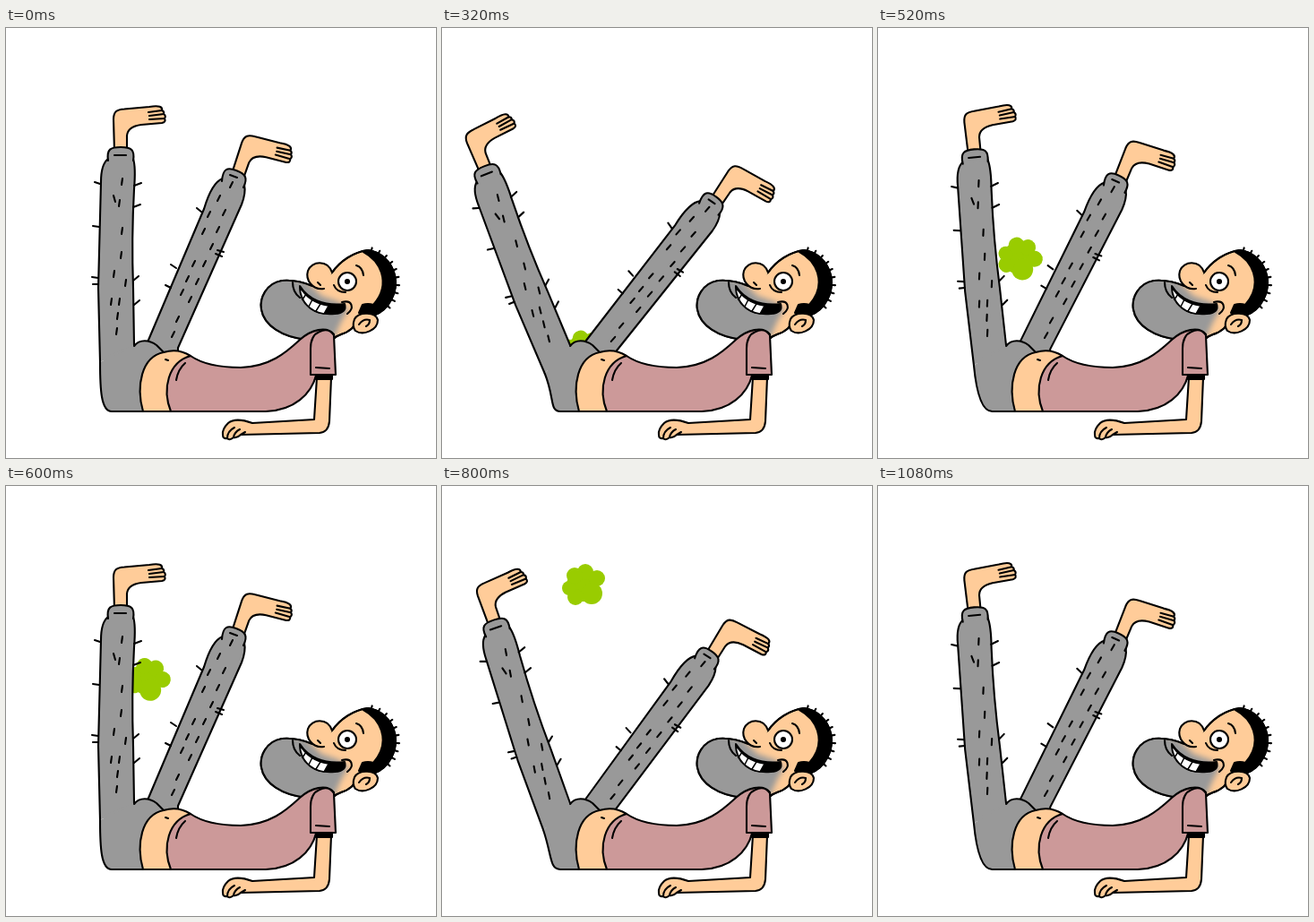
Recreate the animation shown at these times as an HTML page. Size 480 by 480 pixels, loop 1120 ms.

```html
<!DOCTYPE html>
<html>
<head>
<meta charset="utf-8">
<style>
html, body { margin: 0; width: 100%; height: 100%; overflow: hidden; background: #fff; }
svg { display: block; width: 100vw; height: 100vh; }
.line { fill: none; }
.grey { fill: #999; }
.skin { fill: #fc9; }
.shirt { fill: #c99; }
.bare { stroke: none; }
</style>
</head>
<body>
<svg viewBox="0 0 480 480" stroke="#000" stroke-width="2.1" stroke-linecap="round" stroke-linejoin="round">
  <defs>
    <g id="foot">
      <path class="skin" d="M-7 4L-8-32C-8-41-4-43 4-43.500L32-46C43-48 47-46 46-42Q49-41 48-38Q51-36 49-33Q51-29 46-28L23-26Q8-24 7-14V4"/>
      <path class="line" d="M31-40L46-42M32-36L48-38M32-32L49-33"/>
    </g>
    <path id="face" d="M342 288C330 283 318 281 308 282C290 285 283 302 285 314C288 332 308 345 336 348H364Q368 344 374 342Q389 337 390 328L410 321C428 315 438 294 434 276C430 260 418 250 404 248C388 250 373 260 364 273Z"/>
    <clipPath id="faceClip"><use href="#face"/></clipPath>
    <filter id="soft"><feGaussianBlur stdDeviation="3"/></filter>
  </defs>

  <g id="cloud" fill="#9c0" stroke="none">
    <circle r="18"/>
    <circle cx="3" cy="-15" r="9"/><circle cx="16" cy="-8" r="9"/>
    <circle cx="10" cy="9" r="12"/><circle cx="-8" cy="13" r="9"/>
    <circle cx="-15" cy="3" r="8"/><circle cx="-9" cy="-11" r="9"/>
  </g>

  <g id="rightLeg">
    <use href="#foot" transform="translate(260 161) rotate(19.500)"/>
    <path class="grey" d="M160 366L157 353L221 202Q230 172 242 168L266 175Q268 184 263 197L192 357V370"/>
    <path class="grey" d="M241 171C242 157 247 155 257 159C268 163 270 168 265 178"/>
    <path class="line" d="M250 164L258 167M213 201L219 206M184 264L190 268M178 287L184 290M236 248L243 250M234 252L241 255"/>
    <path class="line" id="rightDashes"/>
  </g>

  <g id="leftLeg">
    <use href="#foot" transform="translate(128 134)"/>
    <path class="grey" d="M105 373L103 290L106 172Q106 152 114 146H142Q145 155 143 180Q140 235 142 290L143 354"/>
    <path class="grey bare" d="M107 368L142 354L150 375L125 390Z"/>
    <path class="grey" d="M114 148C112 135 117 133 128 133C140 133 144 136 142 148"/>
    <path class="line" d="M121 142H134M99 172L105 174M143 176L151 173M142 200L150 197M97 221L104 222M142 282L148 277M143 309L149 304M96 278L103 279M97 286H103M120 187L122 194"/>
    <path class="line" id="leftDashes"/>
  </g>

  <path class="grey bare" id="hip"/>
  <path class="line" id="seat"/>
  <path class="line" d="M143 355C149 347 160 348 168 354L176 362"/>

  <path class="skin" d="M153 428C145 400 151 367 176 362Q192 357 206 366L190 428Z"/>
  <path class="line" d="M178 370L181 371"/>

  <use href="#face" class="skin"/>
  <g clip-path="url(#faceClip)" stroke="none">
    <path class="grey" filter="url(#soft)" d="M265 265L335 282L352 299L372 306L382 314L374 328L358 365H265Z"/>
  </g>
  <use href="#face" class="line"/>
  <path d="M404 248C428 252 439 277 432 298Q425 314 410 321L394 318L398 309Q404 307 410 309C419 299 423 286 419 273Q414 258 399 250Z"/>
  <path class="line" id="hair"/>
  <path class="skin" d="M389 325C394 316 413 317 415 326C415 337 399 344 390 338Q386 333 389 325"/>
  <path class="line" d="M394 331Q399 324 406 326Q406 331 402 333"/>
  <path class="skin" d="M355 291C342 293 334 281 337 271C341 260 359 258 364 273"/>
  <path class="line" d="M348 284L351 287M391 265Q398 267 399 276M366 287Q369 295 379 295"/>
  <circle cx="381" cy="283" r="10" fill="#fff"/>
  <circle cx="381" cy="283" r="2" fill="#000"/>
  <path d="M328 288C337 302 354 311 378 308Q381 318 367 319C345 321 328 310 328 288Z"/>
  <path fill="#fff" stroke-width="1.5" d="M328 289C335 301 347 308 360 310L355 319C340 317 329 306 328 289ZM335 297L331 303M342 303L338 311M351 308L346 316"/>
  <path class="line" d="M320 284Q320 295 328 301M375 306C387 303 389 313 381 319"/>

  <path class="shirt" d="M206 366C222 377 242 379 262 379C294 378 312 363 328 348C340 337 358 332 366 342L346 388C341 408 322 427 290 428H184C174 403 181 373 206 366Z"/>
  <path class="line" d="M190 393Q192 381 200 374M153 428H190"/>
  <path class="skin" d="M347 390L344 437L275 441C264 437 254 436 248 441Q241 448 242 454Q242 459 247 458Q249 461 254 457Q258 458 262 454L350 452Q360 451 361 439L363 390Z"/>
  <path class="line" d="M247 458Q247 450 255 446M254 457Q255 451 261 448M262 454L267 451"/>
  <path d="M346 388H364V392H346Z"/>
  <path class="shirt" d="M340 358Q340 343 350 339Q360 334 366 343L368 387H340Z"/>
  <path class="line" d="M346 379L361 380"/>
</svg>
<script>
const el = id => document.getElementById(id);
const dashes = (id, step, points) =>
  el(id).setAttribute('d', points.map(p => `M${p}l${step}`).join(''));

dashes('leftDashes', '-1 7', ['130 168', '127 192', '130 223', '129 250', '121 271', '134 281', '118 302', '127 302', '125 318', '124 335']);
dashes('rightDashes', '-3 6', ['253 172', '239 187', '245 203', '228 205', '238 222', '222 224', '231 241', '211 260', '223 260', '204 277', '215 280', '198 292', '207 300', '193 322', '188 339']);

let spikes = '';
for (let deg = -75; deg <= 45; deg += 13) {
  const a = deg * Math.PI / 180, x = Math.cos(a), y = Math.sin(a);
  spikes += `M${398 + 34 * x} ${285 + 34 * y}l${7 * x} ${7 * y}`;
}
el('hair').setAttribute('d', spikes);

const TICK = 40, LOOP = 1120;
const leftAngles = [0, 7.4, 14.7, 18.8, 21.8, 10.4, 5.4];
const rightAngles = [0, 5.4, 10.8, 13, 14.7, 6.7, 3.3];

function pose(left, right) {
  el('leftLeg').setAttribute('transform', `rotate(${-left} 143 354)`);
  el('rightLeg').setAttribute('transform', `rotate(${right} 168 362)`);
  // The seat continues the turning back of the thigh down to the floor.
  const a = left * Math.PI / 180, c = Math.cos(a), s = Math.sin(a);
  const x = 143 - 38 * c + 19 * s, y = 354 + 38 * s + 19 * c;
  const slide = 14 * Math.min(1, left / 8);
  const seat = `M${x} ${y}C${x + 30 * s} ${y + 30 * c} ${106 + slide} 428 ${118 + slide} 428H153`;
  el('seat').setAttribute('d', seat);
  el('hip').setAttribute('d', seat + 'L176 362L168 354C160 348 149 347 143 355Z');
}

function draw(now) {
  const tick = Math.floor(now % LOOP / TICK), i = (tick >> 1) % 7;
  pose(leftAngles[i], rightAngles[i]);
  const cloud = el('cloud');
  cloud.style.display = tick < 8 ? 'none' : '';
  cloud.setAttribute('transform', `translate(157 ${319 - 20.8 * (tick - 10)}) rotate(${tick < 17 ? 30 : 0})`);
}

const start = performance.now();
function loop() {
  draw(performance.now() - start);
  requestAnimationFrame(loop);
}
loop();
</script>
</body>
</html>
```
